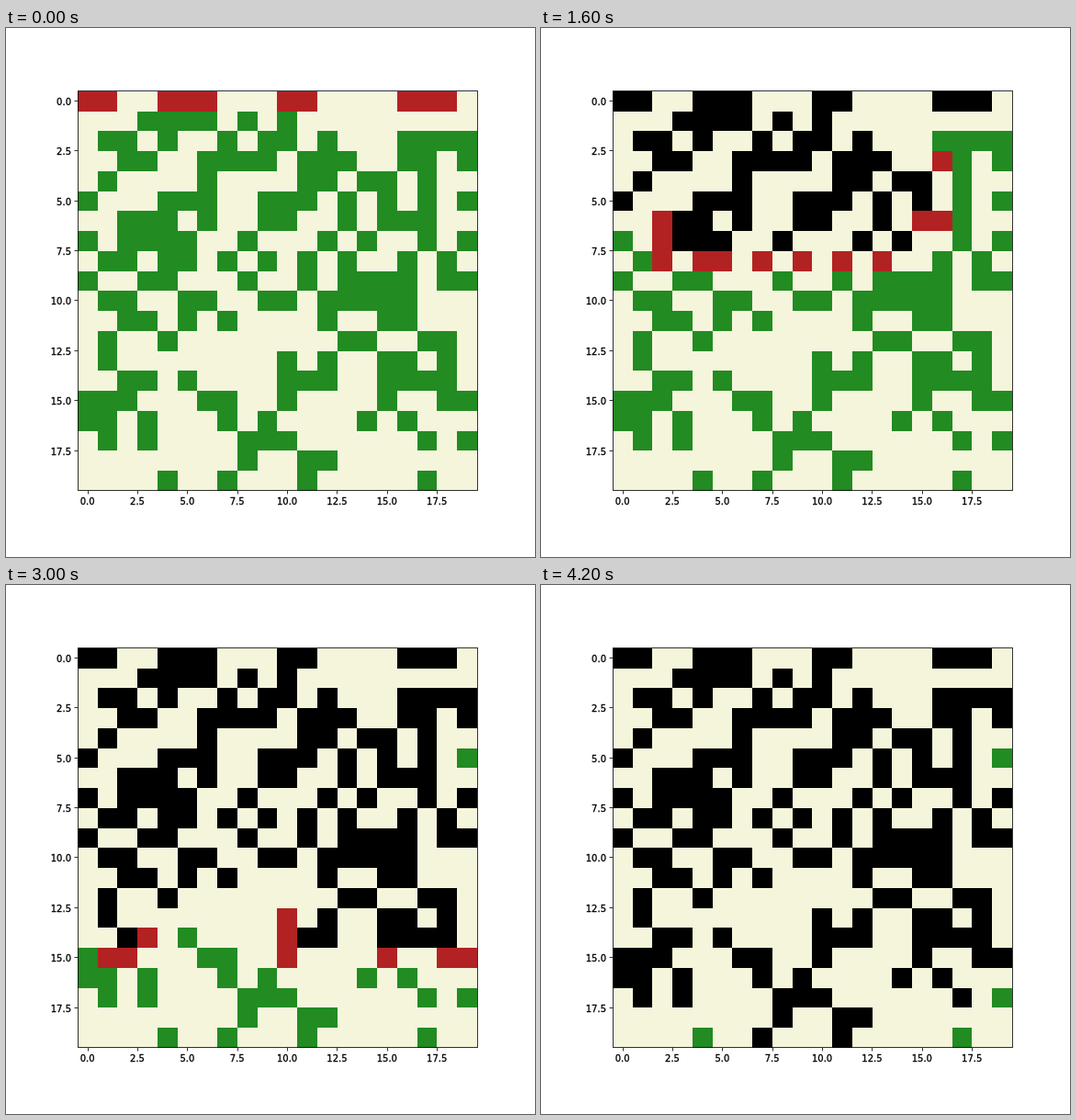
Recreate the animation shown at these times as an HTML page with a canvas. Size 576x576 px, loop 4600 ms.

```html
<!DOCTYPE html>
<html lang="en">
<head>
<meta charset="utf-8">
<title>Forest fire</title>
<style>
  html, body { margin: 0; width: 100%; height: 100%; overflow: hidden; background: #fff; }
  canvas { display: block; }
</style>
</head>
<body>
<canvas id="stage" width="576" height="576"></canvas>
<script>
const STEP = 200, LOOP = 4600;
const SIZE = 20, CELL = 21.744, LEFT = 78, TOP = 69;
const EMPTY = '#f5f5dc', TREE = '#228b22', FIRE = '#b22222', BURNT = '#000';

// Starting forest: T is a tree; the top row is already alight.
const forest = `
TT..TTT...TT....TTT.
...TTTT.T.T.........
.TT.T..T.TT.T...TTTT
..TT..TTTT.TTT..TT.T
.T....T....TT.TT.T..
T...TTT..TTT.T.T.T.T
..TTT.T..TT..T.TTT..
T.TTTT..T...T.T..T.T
.TT.TT.T.T.T.T..T.T.
T..TT...T..T.TTTT.TT
.TT..TT..TT.TTTTT...
..TT.T.T....T..TT...
.T..T........TT..TT.
.T........T.T..TT.T.
..TT.T....TTT..TTTT.
TTT...TT..T....T..TT
TT.T...T.T....T.T...
.T.T....TTT......T.T
........T..TT.......
....T..T...T.....T..`.trim().split('\n');

const ctx = document.getElementById('stage').getContext('2d');
const edge = (start, i) => Math.round(start + i * CELL);

// Step at which each tree catches fire, spreading to all eight neighbours.
const ignition = forest.map(row => [...row].map(() => Infinity));
const queue = [];

function ignite(x, y, step) {
  if (forest[y]?.[x] !== 'T' || ignition[y][x] <= step) return;
  ignition[y][x] = step;
  queue.push([x, y]);
}

for (let x = 0; x < SIZE; x++) ignite(x, 0, 0);
for (const [x, y] of queue)
  for (let dy = -1; dy <= 1; dy++)
    for (let dx = -1; dx <= 1; dx++)
      ignite(x + dx, y + dy, ignition[y][x] + 1);

function colorAt(x, y, step) {
  if (forest[y][x] !== 'T') return EMPTY;
  const start = ignition[y][x];
  return step < start ? TREE : step === start ? FIRE : BURNT;
}

function drawCells(step) {
  for (let y = 0; y < SIZE; y++)
    for (let x = 0; x < SIZE; x++) {
      const px = edge(LEFT, x), py = edge(TOP, y);
      ctx.fillStyle = colorAt(x, y, step);
      ctx.fillRect(px, py, edge(LEFT, x + 1) - px, edge(TOP, y + 1) - py);
    }
}

function label(text, x, y, align) {
  ctx.textAlign = align;
  ctx.fillText(text, x, y);
  ctx.strokeText(text, x, y);
}

function drawAxes() {
  ctx.fillStyle = 'rgba(0,0,0,.8)';
  ctx.fillRect(78, 68, 1, 436);
  ctx.fillRect(513, 68, 1, 436);
  ctx.fillRect(79, 68, 434, 1);
  ctx.fillRect(79, 503, 434, 1);
  for (let v = 0; v < SIZE; v += 2.5) {
    const x = 77.76 + (v + 0.5) * CELL, y = 69.12 + (v + 0.5) * CELL;
    ctx.fillStyle = 'rgba(0,0,0,.8)';
    ctx.fillRect(Math.round(x), 504, 1, 3.5);
    ctx.fillRect(74.5, 575 - Math.round(576 - y), 3.5, 1);
    ctx.fillStyle = '#000';
    label(v.toFixed(1), x, 519, 'center');
    label(v.toFixed(1), 71, Math.round(y) + 4, 'right');
  }
}

function draw() {
  ctx.fillStyle = '#fff';
  ctx.fillRect(0, 0, 576, 576);
  ctx.font = '10px "DejaVu Sans", sans-serif';
  ctx.lineWidth = 0.3;
  drawCells(Math.floor(performance.now() % LOOP / STEP));
  drawAxes();
  requestAnimationFrame(draw);
}
draw();
</script>
</body>
</html>
```
